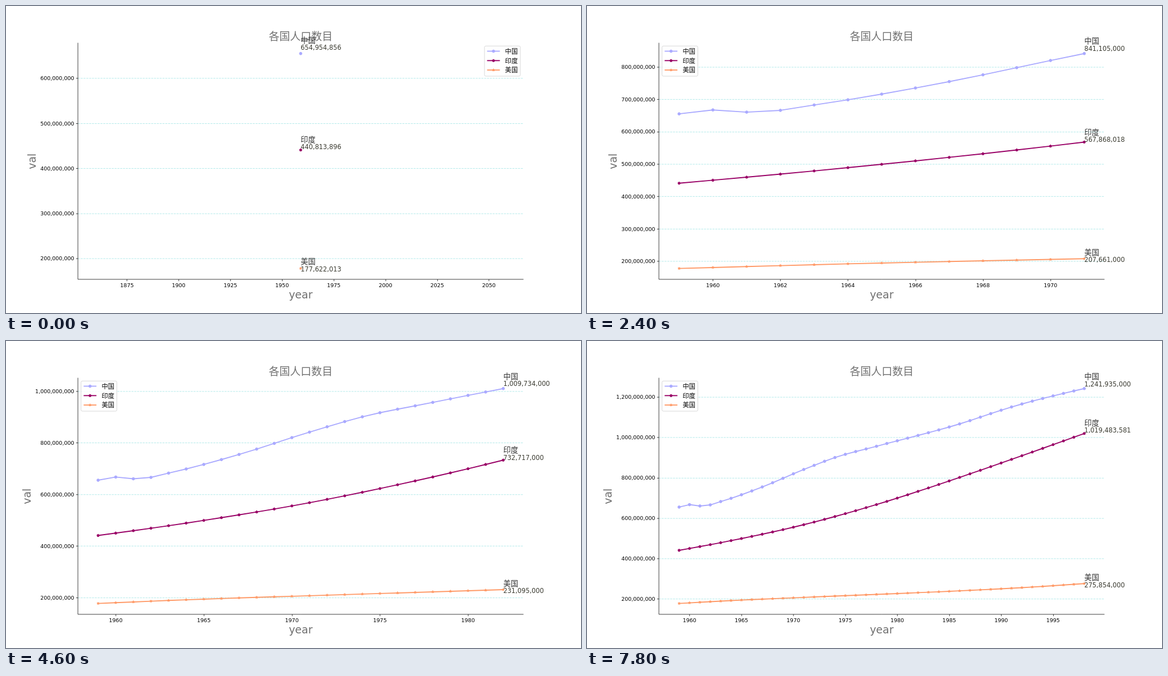
Animation of 1025x547 px, one loop 8000 ms. Source, as an HTML page with a canvas:

```html
<!DOCTYPE html>
<html lang="zh">
<head>
<meta charset="utf-8">
<style>
  html, body { margin: 0; width: 100%; height: 100%; overflow: hidden; background: #fff; }
  canvas { display: block; }
</style>
</head>
<body>
<canvas id="chart" width="1025" height="547"></canvas>
<script>
const ctx = document.getElementById('chart').getContext('2d');
const STEP = 200, FIRST_YEAR = 1959, COUNT = 40;
const PT = 0.949;      // pixels per point
const DOT = 0.6835;    // grid that straight lines snap to
const LATIN = '"DejaVu Sans", sans-serif';
const CJK = '"Noto Sans CJK SC", "Noto Sans CJK", sans-serif';
const GREY = '#707070';
const area = { left: 128.1, right: 922.5, top: 65.6, bottom: 486.8 };
area.width = area.right - area.left;
area.height = area.bottom - area.top;
area.midX = (area.left + area.right) / 2;
area.midY = (area.top + area.bottom) / 2;
const box = { width: 63.8, height: 53.7, pad: 5.7 };

// Key points: years since the first, population in millions
const series = [
  { name: '中国', color: '#aaaaff', sides: 0, keys: [
    [0, 654.954856], [1, 667.07], [2, 660.33], [3, 665.77], [4, 682.335], [5, 698.355], [8, 754.55],
    [12, 841.105], [15, 900.35], [19, 956.165], [27, 1066.79], [32, 1150.78], [39, 1241.935]] },
  { name: '印度', color: '#990066', sides: 5, keys: [
    [0, 440.813896], [5, 488.848135], [12, 567.868018], [19, 667.499806],
    [27, 801.975244], [32, 891.273209], [39, 1019.483581]] },
  { name: '美国', color: '#ff9966', sides: 5, inner: 0.382, keys: [
    [0, 177.622013], [5, 191.889], [12, 207.661], [19, 222.585],
    [27, 240.133], [32, 252.981], [39, 275.854]] }
];

// Smooth cubic through the key points; years in between are rounded to thousands
function curve(keys) {
  const end = keys.length - 1;
  const gap = i => keys[i + 1][0] - keys[i][0];
  const rise = i => (keys[i + 1][1] - keys[i][1]) / gap(i);
  const inner = i => (rise(i - 1) * gap(i) + rise(i) * gap(i - 1)) / (gap(i - 1) + gap(i));
  const slope = i =>
    i === 0 ? (3 * rise(0) - inner(1)) / 2 :
    i === end ? (3 * rise(end - 1) - inner(end - 1)) / 2 : inner(i);
  return x => {
    const exact = keys.find(k => k[0] === x);
    if (exact) return exact[1] * 1e6;
    const i = keys.findIndex(k => k[0] > x) - 1;
    const h = gap(i), d = rise(i), t = (x - keys[i][0]) / h, u = 1 - t;
    const bend = h * t * u * (u * (slope(i) - d) - t * (slope(i + 1) - d));
    return Math.round((keys[i][1] + d * h * t + bend) * 1e3) * 1e3;
  };
}
for (const s of series) s.values = Array.from({ length: COUNT }, (_, i) => curve(s.keys)(i));

const withCommas = v => String(Math.round(v)).replace(/\B(?=(\d{3})+$)/g, ',');
const snap = v => (Math.round(v / DOT) + 0.5) * DOT;

function text(str, x, y, points, color, align = 'left', family = LATIN) {
  ctx.font = `${points * PT}px ${family}`;
  ctx.fillStyle = color;
  ctx.textAlign = align;
  ctx.fillText(str, x, y);
}

function polyline(points, color, width, dash = []) {
  ctx.strokeStyle = color;
  ctx.lineWidth = width;
  ctx.setLineDash(dash);
  ctx.beginPath();
  points.forEach(([x, y]) => ctx.lineTo(x, y));
  ctx.stroke();
  ctx.setLineDash([]);
}

function marker({ color, sides, inner }, x, y) {
  const r = 2.5 * PT;
  ctx.beginPath();
  if (!sides) {
    ctx.arc(x, y, r, 0, 2 * Math.PI);
  } else {
    const corners = inner ? sides * 2 : sides;
    for (let i = 0; i < corners; i++) {
      const a = 2 * Math.PI * i / corners, d = inner && i % 2 ? r * inner : r;
      ctx.lineTo(x + d * Math.sin(a), y - d * Math.cos(a));
    }
    ctx.closePath();
  }
  ctx.fillStyle = ctx.strokeStyle = color;
  ctx.lineWidth = PT;
  ctx.lineJoin = inner ? 'bevel' : 'miter';
  ctx.fill();
  ctx.stroke();
}

// Smallest round step that gives at most nine intervals
function ticks(min, max) {
  const raw = (max - min) / 9, scale = 10 ** Math.floor(Math.log10(raw));
  const step = [1, 2, 2.5, 5, 10].map(m => m * scale).find(s => s >= raw);
  const values = [];
  for (let i = Math.ceil(min / step); i * step <= max; i++) values.push(i * step);
  return { step, values };
}

function yearLabels({ step, values }, n) {
  const digits = step % 1 === 0 ? 0 : Math.abs(step - 0.25) < 1e-9 ? 2 : 1;
  // A one-year span straddling a decade is labelled relative to its end
  const base = n === 1 ? FIRST_YEAR + 1 : 0;
  return values.map(v => {
    const d = v - base;
    return (d < -1e-6 ? '−' : '') + Math.abs(d).toFixed(digits);
  });
}

// Points inside the legend box, plus one for each line that crosses it
function badness(x, y, lines) {
  const r = x + box.width, b = y + box.height;
  let score = 0;
  for (const line of lines) {
    score += line.filter(p => p[0] > x && p[0] < r && p[1] > y && p[1] < b).length;
    const crosses = line.slice(1).some(([x1, y1], i) => {
      const [x0, y0] = line[i], from = Math.max(x0, x), to = Math.min(x1, r);
      if (from > to) return false;
      const at = px => y0 + (y1 - y0) * (px - x0) / (x1 - x0);
      return Math.max(at(from), at(to)) >= y && Math.min(at(from), at(to)) <= b;
    });
    if (crosses) score++;
  }
  return score;
}

// The legend takes the spot that covers the least data
function legendSpot(lines) {
  const l = area.left + box.pad, r = area.right - box.pad - box.width, c = area.midX - box.width / 2;
  const t = area.top + box.pad, b = area.bottom - box.pad - box.height, m = area.midY - box.height / 2;
  const spots = [[r, t], [l, t], [l, b], [r, b], [r, m], [l, m], [c, b], [c, t], [c, m]];
  const scores = spots.map(([x, y]) => badness(x, y, lines));
  return spots[scores.indexOf(Math.min(...scores))];
}

function drawLegend([x, y]) {
  ctx.beginPath();
  ctx.roundRect(x, y, box.width, box.height, 2.3);
  ctx.fillStyle = 'rgba(255,255,255,0.8)';
  ctx.fill();
  ctx.strokeStyle = 'rgba(204,204,204,0.8)';
  ctx.lineWidth = PT;
  ctx.stroke();
  series.forEach((s, i) => {
    const cy = y + 9.2 + i * 16.8, x0 = x + 4.6;
    polyline([[x0, cy], [x0 + 22.8, cy]], s.color, 2 * PT);
    marker(s, x0 + 11.4, cy);
    text(s.name, x + 36.6, cy + 4.2, 12, '#000', 'left', CJK);
  });
}

function draw(n) {
  const last = FIRST_YEAR + n;
  const halfSpan = n ? n * 0.55 : FIRST_YEAR * 0.055;
  const xMin = (FIRST_YEAR + last) / 2 - halfSpan, xMax = xMin + 2 * halfSpan;
  const shown = series.map(s => s.values.slice(0, n + 1));
  const low = Math.min(...shown.flat()), high = Math.max(...shown.flat());
  const margin = (high - low) * 0.05, yMin = low - margin, yMax = high + margin;
  const px = v => area.left + (v - xMin) / (xMax - xMin) * area.width;
  const py = v => area.bottom - (v - yMin) / (yMax - yMin) * area.height;
  const lines = shown.map(vals => vals.map((v, i) => [px(FIRST_YEAR + i), py(v)]));
  const xTicks = ticks(xMin, xMax), yTicks = ticks(yMin, yMax);
  const left = snap(area.left), bottom = snap(area.bottom);

  ctx.fillStyle = '#fff';
  ctx.fillRect(0, 0, 1025, 547);

  let widest = 0;
  for (const v of yTicks.values) {
    const y = snap(py(v)), label = withCommas(v);
    polyline([[left, y], [area.right, y]], '#afe9e9', PT, [3.7 * PT, 1.6 * PT]);
    polyline([[left - 3.3, y], [left, y]], '#000', 0.8 * PT);
    text(label, area.left - 6.6, py(v) + 3.5, 10, '#000', 'right');
    widest = Math.max(widest, ctx.measureText(label).width);
  }

  const labels = yearLabels(xTicks, n);
  xTicks.values.forEach((v, i) => {
    const x = snap(px(v));
    polyline([[x, bottom], [x, bottom + 3.3]], '#000', 0.8 * PT);
    text(labels[i], px(v), 501, 10, '#000', 'center');
  });
  if (n === 1) text('+1.96e3', area.right, 513, 10, '#000', 'right');

  series.forEach((s, i) => {
    ctx.lineJoin = 'round';
    polyline(lines[i], s.color, 2 * PT);
    lines[i].forEach(([x, y]) => marker(s, x, y));
  });
  ctx.lineJoin = 'miter';
  polyline([[left, area.top], [left, bottom], [area.right, bottom]], '#000', 0.8 * PT);

  text('各国人口数目', area.midX, 61, 20, GREY, 'center', CJK);
  text('year', area.midX, 521.2, 20, GREY, 'center');
  ctx.save();
  ctx.translate(area.left - 14.3 - widest, area.midY + 0.5);
  ctx.rotate(-Math.PI / 2);
  text('val', 0, 0, 20, GREY, 'center');
  ctx.restore();

  // Captions float three percent above the newest value
  series.forEach((s, i) => {
    const value = shown[i][n], x = px(last), y = py(value * 1.03);
    text(s.name, x, y - 3.1, 14, '#333', 'left', CJK);
    text(withCommas(value), x, y + 9.4, 12, '#3d3d33');
  });

  drawLegend(legendSpot(lines));
}

function tick() {
  draw(Math.floor(performance.now() / STEP) % COUNT);
  requestAnimationFrame(tick);
}
tick();
</script>
</body>
</html>
```
